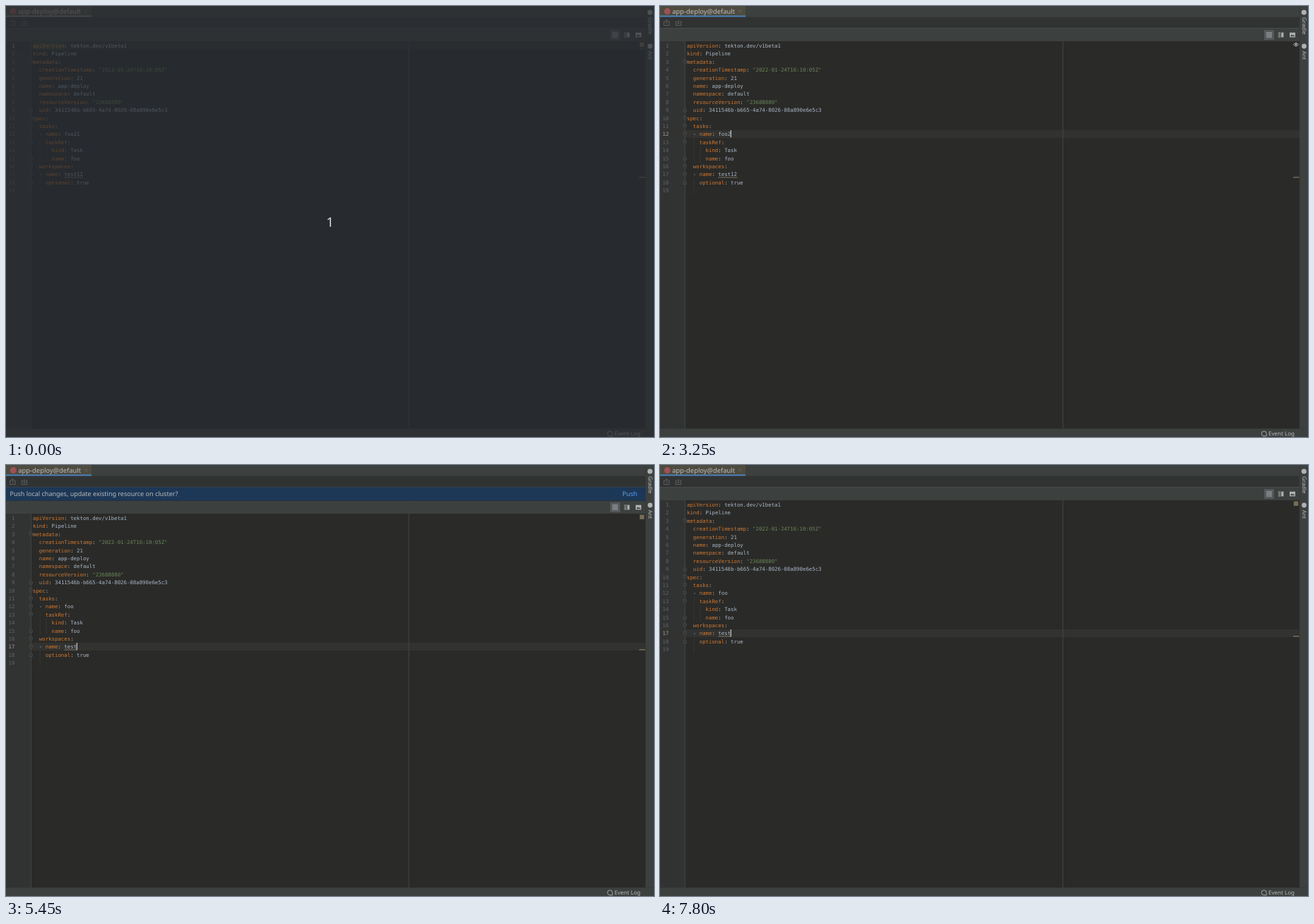
These frames come from a looping animation (917 px wide and 611 px high, 8 s). An HTML page:

```html
<!DOCTYPE html>
<html lang="en">
<head>
<meta charset="utf-8">
<title>Pipeline editor</title>
<style>
  html, body { margin: 0; width: 100%; height: 100%; overflow: hidden; background: #3c403e; }
  svg { display: block; width: 100%; height: 100%; text-rendering: geometricPrecision; }
  text { font-family: "Noto Sans", "Open Sans", sans-serif; fill: #bbbbbb; white-space: pre; }
  .code, .num { font: 7.36px "DejaVu Sans Mono", monospace; fill: #a9b7c6; }
  .num { fill: #606366; text-anchor: end; }
  .num.on { fill: #a4a3a3; }
  .key { fill: #cc7832; }
  .str { fill: #6a8759; }
  .line { fill: none; stroke: #afb1b3; }
</style>
</head>
<body>
<svg id="stage" viewBox="0 0 917 611"></svg>
<script>
const LOOP = 8000;
const LEFT = 38, CHAR = 4.43, ROW = 11.4, TOP = 50.5, BASE = 58.9, BAR = 19;
const PANEL = "#3c403e", GUTTER = "#313333", EDITOR = "#2a2a28";

const source = `apiVersion: tekton.dev/v1beta1
kind: Pipeline
metadata:
  creationTimestamp: "2022-01-24T16:10:05Z"
  generation: 21
  name: app-deploy
  namespace: default
  resourceVersion: "23688880"
  uid: 3411546b-b665-4a74-8026-08a890e6e5c3
spec:
  tasks:
  - name: foo21
    taskRef:
      kind: Task
      name: foo
  workspaces:
  - name: test12
    optional: true
`.split("\n");

// Each step changes part of the state from its time on.
const steps = [
  [0, { countdown: true, row: 1, col: 0, caret: false, task: "foo21", space: "test12",
        icon: "done", focus: false, mark: true, bar: false, link: "plain" }],
  [50, { countdown: false }],
  [1000, { row: 12, col: 15 }],
  [1300, { mark: false }],
  [2100, { caret: true, icon: "pause" }],
  [2150, { focus: true }],
  [2400, { icon: "done" }],
  [3250, { task: "foo2", col: 14, icon: "eye" }],
  [3350, { bar: true }],
  [3700, { task: "foo", col: 13 }],
  [4250, { icon: "done" }],
  [4750, { row: 17, col: 16 }],
  [5100, { space: "test1", col: 15, icon: "eye" }],
  [5300, { space: "test", col: 14 }],
  [5450, { icon: "done" }],
  [6200, { caret: false }],
  [6550, { link: "hover" }],
  [6700, { caret: true }],
  [7150, { link: "pressed" }],
  [7250, { caret: false }],
  [7450, { link: "hover" }],
  [7500, { bar: false, link: "plain" }],
  [7800, { caret: true }],
];

const stage = document.getElementById("stage");

function add(parent, tag, attrs = {}, content = "") {
  const el = document.createElementNS("http://www.w3.org/2000/svg", tag);
  for (const name in attrs) el.setAttribute(name, attrs[name]);
  el.textContent = content;
  parent.append(el);
  return el;
}
const group = parent => add(parent, "g");
const rect = (parent, x, y, width, height, fill) => add(parent, "rect", { x, y, width, height, fill });
const path = (parent, d, width = 0.8, stroke = "#afb1b3") =>
  add(parent, "path", { d, class: "line", style: `stroke:${stroke};stroke-width:${width}` });
const dot = (parent, cx, cy, r, fill) => add(parent, "circle", { cx, cy, r, fill });
const label = (parent, x, y, size, content, attrs = {}) =>
  add(parent, "text", { x, y, "font-size": size, ...attrs }, content);
const show = (el, on) => el.setAttribute("visibility", on ? "visible" : "hidden");
const rowTop = n => TOP + ROW * (n - 1);
const baseline = n => BASE + ROW * (n - 1);
const colX = n => LEFT + CHAR * n;

// Window frame
rect(stage, 0, 0, 917, 611, PANEL);
rect(stage, 0, 0, 121, 15, "#4e4b40");
const tabLine = rect(stage, 0, 13.6, 121, 2, "#8f8d7e");
dot(stage, 10.3, 7.6, 4.5, "#9c5257");
label(stage, 17.3, 10.8, 9.4, "app-deploy@default");
path(stage, "M111.4 5.2l4 4m0-4l-4 4", 0.6, "#76776f");
rect(stage, 0, 15.6, 905, 15.6, GUTTER);
path(stage, "M0 31.6H905", 0.8, "#4d5150");
for (const [x, arrow] of [[9.3, "m-1.7-4.3l1.7-1.7 1.7 1.7"], [26, "m-1.7-1.8l1.7 1.7 1.7-1.7"]]) {
  path(stage, `M${x - 1.5} 22h-2.2v5.6h7.4v-5.6h-2.2M${x} 20v5.6M${x} 25.6${arrow}`, 0.7, "#707274");
}

// Editor background
rect(stage, 0, 50, 35, 549, GUTTER);
rect(stage, 35, 50, 870, 549, EDITOR);
const pane = group(stage);
const caretRow = rect(pane, 0, 0, 905, 11, "#323230");
path(stage, "M35.4 50V599M570.1 50V599", 0.8, "#4d4d4b");

// Notification bar
const bar = group(stage);
rect(bar, 0, 31.5, 905, 19, "#1d3857");
label(bar, 5.5, 44.1, 9, "Push local changes, update existing resource on cluster?");
const link = label(bar, 872.2, 44.1, 9.2, "Push");
const linkLine = path(bar, "M873 45.4H894", 0.8, "#589df6");

// View toolbar, code and markers move down together under the bar
const body = group(stage);
rect(body, 0, 32, 905, 18, PANEL);
rect(body, 855, 34, 14, 14, "#55595b");
path(body, "M858 37.8h8m-8 2.1h8m-8 2.1h8m-8 2.1h8", 0.9);
path(body, "M874.8 38h3.6m-3.6 2h3.6m-3.6 2h3.6m-3.6 2h3.6", 0.9);
rect(body, 879.2, 37.6, 3.2, 6.8, "#afb1b3");
rect(body, 891, 37.7, 8, 6.6, "#afb1b3");
add(body, "path", { d: "M892 43l2-2.7 1.5 1.7 1.3-1 1.5 2z", fill: PANEL });

const mark = group(body);
rect(mark, LEFT, TOP, CHAR * 10 + 0.5, ROW, "#344134");
rect(mark, 896.5, 60.6, 7, 1, "#3d6b3f");
rect(body, 896, 242.3, 8.5, 1.1, "#8c8468");

// Indent guides: column, first row, last row
for (const [col, from, to] of [[2, 13, 15], [4, 14, 15], [2, 18, 19]]) {
  path(body, `M${colX(col) + 1.4} ${rowTop(from)}V${rowTop(to + 1)}`, 0.6, "#3d3d3d");
}

function fold(row, end) {
  const y = rowTop(row) + 5.8, s = end ? -1 : 1;
  const d = `M33.1 ${y - 2.4 * s}h4.2v${3.2 * s}l-2.1 ${1.8 * s}-2.1 ${-1.8 * s}z`;
  path(body, d, 0.55, "#5c5e5f").style.fill = "#2e302f";
  path(body, `M34.2 ${y}h2`, 0.55, "#5c5e5f");
}
[3, 10, 11, 12, 13, 16, 17].forEach(row => fold(row, false));
[9, 15, 18].forEach(row => fold(row, true));

const values = [], numbers = [];
source.forEach((line, i) => {
  const y = baseline(i + 1);
  numbers.push(add(body, "text", { x: 12.4, y, class: "num" }, i + 1));
  const [, indent, dash = "", key, value] = line.match(/^( *)(- )?(\w*):?(.*)$/);
  if (!key) return;
  const text = add(body, "text", { x: colX(indent.length), y, class: "code" });
  add(text, "tspan", {}, dash);
  add(text, "tspan", { class: "key" }, key);
  add(text, "tspan", {}, ":");
  values[i + 1] = add(text, "tspan", { class: value.includes('"') ? "str" : "" }, value);
});
const wave = path(body, "", 0.7, "#a09d83");
const caret = rect(body, 0, 0, 1.2, 10.3, "#cccccc");

// Analysis status
const icons = { done: group(body), pause: group(body), eye: group(body) };
rect(icons.done, 896.8, 51.5, 6.4, 6.4, "#756d56");
rect(icons.pause, 898.2, 52, 1.3, 5.3, "#c4c6c8");
rect(icons.pause, 900.6, 52, 1.3, 5.3, "#c4c6c8");
path(icons.eye, "M896.5 54.6Q900 49.8 903.5 54.6Q900 59.4 896.5 54.6z", 0.9, "#bfc1c3");
dot(icons.eye, 900, 54.6, 1.3, "#bfc1c3");

// Side strip and status bar
rect(stage, 905, 0, 12, 599, PANEL);
path(stage, "M905 0V599M0 599.2H917", 0.7, "#353836");
dot(stage, 911.3, 9, 3.6, "#afb1b3");
label(stage, 0, 0, 7.8, "Gradle", { transform: "translate(908.7 16) rotate(90)" });
dot(stage, 911.5, 57, 3.4, "#afb1b3");
label(stage, 0, 0, 7.8, "Ant", { transform: "translate(908.7 63.8) rotate(90)" });
path(stage, "M855 609.7a3.5 3.5 0 1 1 3.2-3.5v3.5z", 0.9);
label(stage, 861, 609.1, 8, "Event Log");

// Countdown
const countdown = group(stage);
rect(countdown, 0, 0, 917, 611, "rgba(39,44,49,.7)");
label(countdown, 458.5, 312.5, 18.6, "1", { "text-anchor": "middle", style: "fill:#d8dadc" });

function wavePath(length) {
  const y = baseline(17) + 1.3, count = Math.round(length * CHAR / 1.5);
  let d = `M${colX(10)} ${y + 0.9}`;
  for (let i = 0; i < count; i++) d += `l1.5 ${i % 2 ? 0.9 : -0.9}`;
  return d;
}

function render(s) {
  show(countdown, s.countdown);
  show(mark, s.mark);
  show(bar, s.bar);
  show(linkLine, s.bar && s.link !== "plain");
  show(caret, s.caret);
  for (const name in icons) show(icons[name], name === s.icon);

  const shift = `translate(0 ${s.bar ? BAR : 0})`;
  body.setAttribute("transform", shift);
  pane.setAttribute("transform", shift);
  tabLine.setAttribute("fill", s.focus ? "#4a88c7" : "#8f8d7e");
  const linkColor = s.link === "pressed" ? "#ba6f25" : "#589df6";
  link.style.fill = linkColor;
  linkLine.style.stroke = linkColor;

  values[12].textContent = " " + s.task;
  values[17].textContent = " " + s.space;
  wave.setAttribute("d", wavePath(s.space.length));
  numbers.forEach((el, i) => el.classList.toggle("on", i + 1 === s.row));
  caretRow.setAttribute("y", Math.round(rowTop(s.row)));
  caret.setAttribute("x", colX(s.col) - 0.3);
  caret.setAttribute("y", rowTop(s.row) + 0.2);
}

let shown = -1;
const start = performance.now();
function tick() {
  const time = (performance.now() - start) % LOOP;
  const count = steps.filter(([at]) => at <= time).length;
  if (count !== shown) {
    shown = count;
    render(Object.assign({}, ...steps.slice(0, count).map(([, change]) => change)));
  }
  requestAnimationFrame(tick);
}
tick();
</script>
</body>
</html>
```
